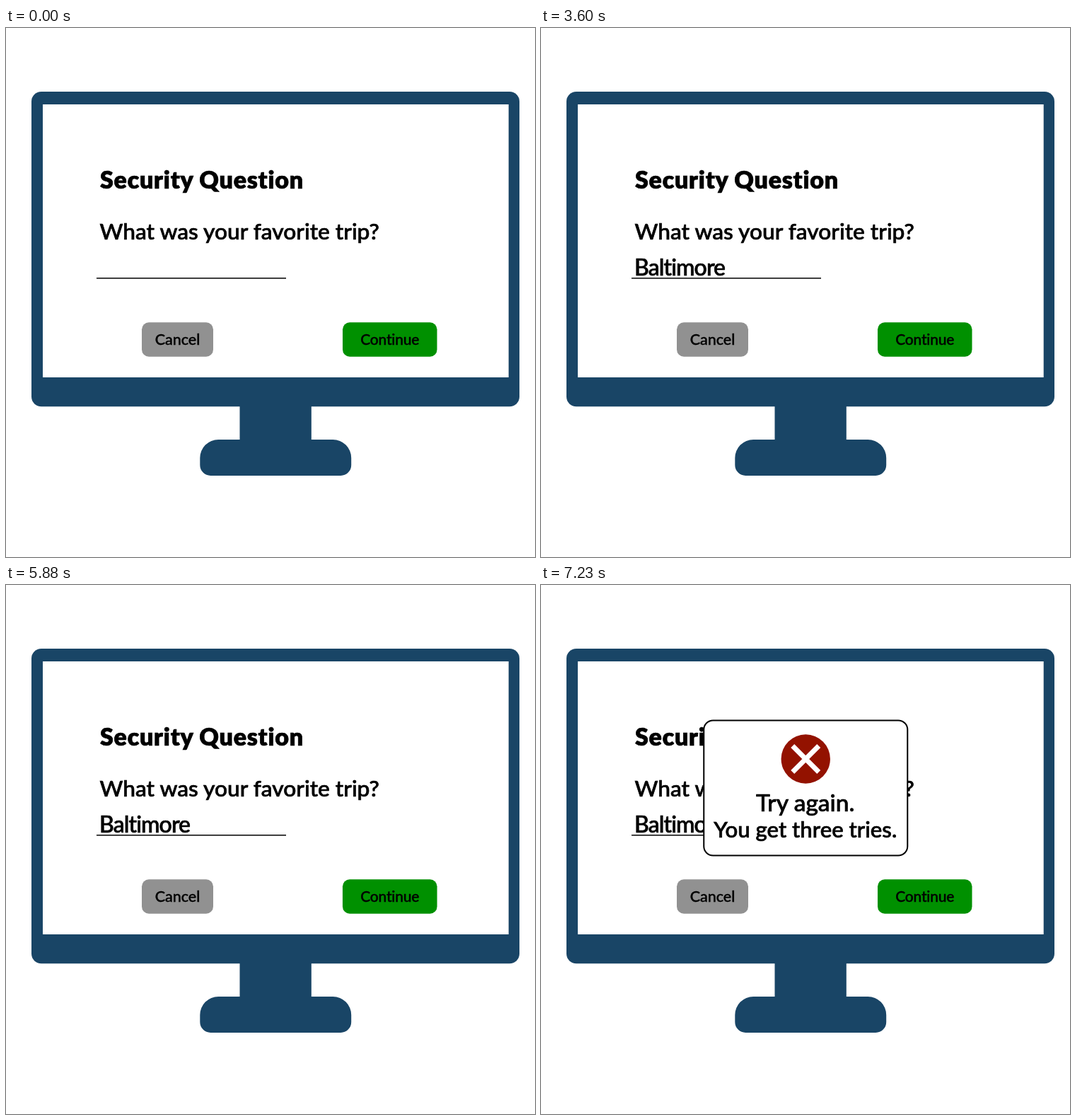
Animation, 748 px wide and 748 px high, one loop 8000 ms. Source, as an HTML page:

```html
<!DOCTYPE html>
<html lang="en">
<head>
<meta charset="utf-8">
<title>Security question</title>
<style>
  html, body { margin: 0; width: 100%; height: 100%; overflow: hidden; background: #fff; }
  svg { display: block; width: 100%; height: 100%; }
  text {
    font: 500 31.7px Lato, "Open Sans", sans-serif;
    font-variant-ligatures: none;
    stroke: #000; stroke-width: .7px;
  }
  .title { font-size: 34px; font-weight: 900; letter-spacing: .75px; }
  .answer { font-size: 32px; letter-spacing: -.9px; }
  .label { font-size: 21.5px; text-anchor: middle; stroke-width: .4px; }
  .go { font-size: 21px; letter-spacing: -.2px; }
  .note { text-anchor: middle; font-size: 33.5px; }
  .small { font-size: 31.2px; }
</style>
</head>
<body>
<svg viewBox="0 0 748 748">
  <g fill="#194566">
    <rect x="36" y="90" width="690" height="445.300" rx="14"/>
    <rect x="330.500" y="530" width="101.300" height="56"/>
    <path d="M274.300 608A26 26 0 0 1 300.300 582H462.200A26 26 0 0 1 488.200 608V618A15 15 0 0 1 473.200 633H289.300A15 15 0 0 1 274.300 618Z"/>
  </g>
  <rect x="52" y="108" width="658.700" height="386" fill="#fff"/>

  <text class="title" x="133" y="227">Security Question</text>
  <text x="132.500" y="299">What was your favorite trip?</text>
  <text id="answer" class="answer" x="132" y="350"></text>
  <path d="M128 353.800H396" stroke="#000" stroke-width="1.600"/>
  <path id="caret" d="M0 318V357.500" stroke="#000" stroke-width="1.100"/>

  <rect x="192" y="416.300" width="101" height="48.400" rx="10" fill="#919191"/>
  <text class="label" x="242.500" y="448">Cancel</text>

  <g id="button">
    <rect x="-66.750" y="-24.200" width="133.500" height="48.400" rx="10" fill="#009000"/>
    <text class="label go" x="0" y="7.500">Continue</text>
  </g>

  <g id="popup">
    <rect x="-144" y="-95.500" width="288" height="191" rx="13" fill="#fff" stroke="#000" stroke-width="2"/>
    <circle cy="-41" r="34.700" fill="#931200"/>
    <path d="M-18.500 -59.500L18.500 -22.500M18.500 -59.500L-18.500 -22.500" stroke="#fff" stroke-width="7"/>
    <text class="note" x="-.5" y="33">Try again.</text>
    <text class="note small" x="-.5" y="69.500">You get three tries.</text>
  </g>
</svg>
<script>
  const LOOP = 8000;
  const WORD = "Baltimore";
  const KEY_TIMES = [1530, 1590, 1920, 2070, 2250, 2310, 2370, 2760, 2970];
  const CARET_STOPS = [131.5, 151, 169.5, 177, 185, 193, 218, 235, 246, 262.5];

  const el = id => document.getElementById(id);
  const answer = el("answer"), caret = el("caret"), button = el("button"), popup = el("popup");
  const progress = (t, from, to) => Math.min(1, Math.max(0, (t - from) / (to - from)));

  function place(node, x, y, scale) {
    node.setAttribute("transform", `translate(${x} ${y}) scale(${scale})`);
  }

  function drawTyping(t) {
    const typed = KEY_TIMES.filter(k => t >= k).length;
    answer.textContent = WORD.slice(0, typed);
    place(caret, CARET_STOPS[typed], 0, 1);
    caret.setAttribute("opacity", progress(t, 900, 1470) - progress(t, 3030, 3600));
  }

  function drawButton(t) {
    const swell = Math.sin(Math.PI * progress(t, 4950, 5910)) ** 2;
    place(button, 542.75, 440.5, 1 + 0.1 * swell);
  }

  // Grows past full size, then settles back.
  function drawPopup(t) {
    const start = 6816, peakTime = 7123, peak = 1.09;
    const grown = peak * progress(t, start, peakTime);
    const settled = (peak - 1) * progress(t, peakTime, 7230);
    place(popup, 374.25, 287, grown - settled);
    popup.setAttribute("opacity", progress(t, start, 7137));
  }

  function draw(t) {
    drawTyping(t);
    drawButton(t);
    drawPopup(t);
  }

  const start = performance.now();
  function tick() {
    draw((performance.now() - start) % LOOP);
    requestAnimationFrame(tick);
  }
  tick();
</script>
</body>
</html>
```
